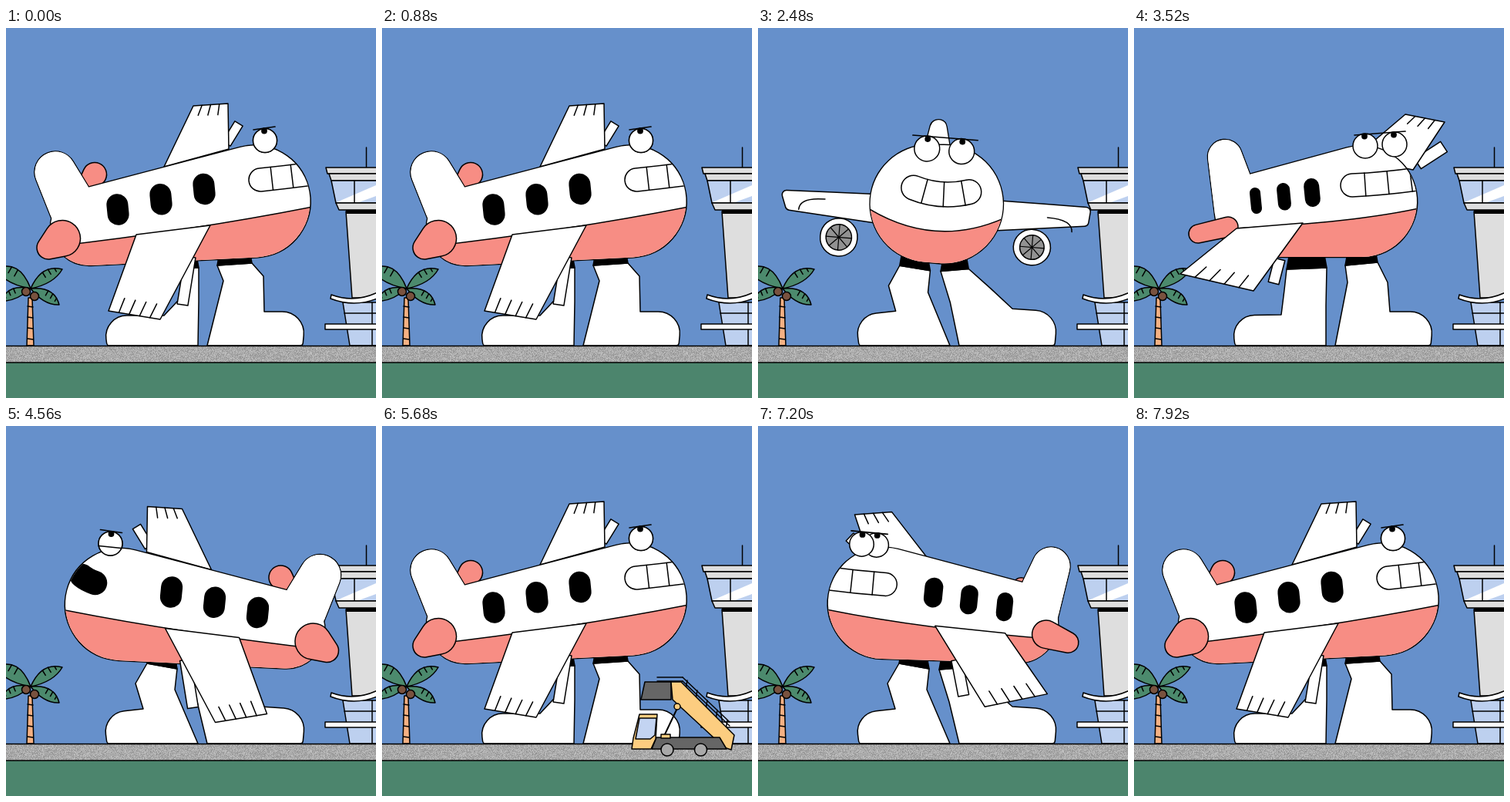
Recreate the animation shown at these times as an HTML page with a canvas. Size 480x480 px, loop 8 s.

```html
<!DOCTYPE html>
<html lang="en">
<head>
<meta charset="utf-8">
<title>Plane twist</title>
<style>
html, body { margin: 0; width: 100%; height: 100%; overflow: hidden; background: #6690cb; }
canvas { display: block; width: 100vw; height: 100vh; }
</style>
</head>
<body>
<canvas id="stage" width="480" height="480"></canvas>
<script>
const STEP = 80, LOOP = 8000, AXIS = 235.75, MIDDLE = 228;
const INK = '#000', WHITE = '#fff', CORAL = '#f78d84';
const ctx = document.getElementById('stage').getContext('2d');

// ---------- helpers ----------
const mix = (a, b, k) => a + (b - a) * k;
const mixPt = (p, q, k) => p.map((v, i) => mix(v, q[i], k));
const parse = text => text.split(' ').map(t => {
  const [x, y, r = 0] = t.split(',').map(Number);
  return [x, y, r];
});
function paint(fill, width = 1.5) {
  if (fill) { ctx.fillStyle = fill; ctx.fill(); }
  if (width) { ctx.lineWidth = width; ctx.strokeStyle = INK; ctx.stroke(); }
}
function line(a, b, width) {
  ctx.beginPath();
  ctx.moveTo(a[0], a[1]);
  ctx.lineTo(b[0], b[1]);
  paint(null, width);
}
function poly(text, fill, width) {
  ctx.beginPath();
  parse(text).forEach(([x, y]) => ctx.lineTo(x, y));
  ctx.closePath();
  paint(fill, width);
}
function circle([x, y, r], fill, width) {
  ctx.beginPath();
  ctx.arc(x, y, r, 0, 7);
  paint(fill, width);
}
function quad([a, c, b]) {
  ctx.beginPath();
  ctx.moveTo(a[0], a[1]);
  ctx.quadraticCurveTo(c[0], c[1], b[0], b[1]);
}
// hull of two circles
function capsule([[x1, y1, r1], [x2, y2, r2]]) {
  const dx = x2 - x1, dy = y2 - y1, a = Math.atan2(dy, dx);
  const ratio = (r1 - r2) / (Math.hypot(dx, dy) || 1);
  const b = Math.acos(Math.max(-1, Math.min(1, ratio)));
  ctx.beginPath();
  ctx.arc(x1, y1, r1, a + b, a - b + 2 * Math.PI);
  ctx.arc(x2, y2, r2, a - b, a + b);
  ctx.closePath();
}
// polygon with a corner radius per point
function rounded(pts) {
  const n = pts.length;
  ctx.beginPath();
  ctx.moveTo(mix(pts[n - 1][0], pts[0][0], .5), mix(pts[n - 1][1], pts[0][1], .5));
  pts.forEach(([x, y, r], i) => {
    const next = pts[(i + 1) % n];
    ctx.arcTo(x, y, next[0], next[1], r);
  });
  ctx.closePath();
}

// ---------- plane: key points facing right, three-quarter and front ----------
const PARTS = {
  body: ['108,258,50 322,225,72.5', '160,243,54 295,225,72', '229,228,77 242.5,228,77'],
  fin: ['64,187,26.5 93,245,32', '118,167,22 136,240,31', '236,128,10 236,151,15'],
  tailNear: ['73,273,23.5 55,285,15', '122,258,13 83,267,12', '236,228,1 237,228,1'],
  tailFar: ['115,190,15.5 104,201,10', '145,215,6 146,220,6', '236,228,1 235,228,1'],
  wingNear: ['169,268 265,256 200,378 133,367', '133,260 219,253 155,341 60,319', '157,220 157,260 36,247,6 31,222,6'],
  wingFar: ['205,180 289,157 288,98 243,101', '286,168 362,184 403,122 352,112', '314.5,220 314.5,260 435.5,247,6 440.5,222,6'],
  engineNear: ['239,297,7 229,359,7', '189,300,7 181,331,7', '109,255,25 109,305,25'],
  engineFar: ['286,150,6 302,124,6', '368,176,8 402,154,8', '362.5,255,25 362.5,305,25'],
  belt: ['55,284 240,263 397,232', '100,261 270,255 369,234', '150,240 235.75,288 321.5,240'],
  mouth: ['330,197,15 367,193,15 405,188,15', '283,204,15 325,202,15 368,196,14', '200,210,16 235.75,222,16 271.5,210,16'],
  eyes: ['336,146,15.5 336,146,15.5', '300,153,16 338,151,16', '213,158,16.5 258.5,158,16.5'],
  brow: ['321,132 349,128', '286,139 352,134', '193,142 278.5,142'],
  panes: ['145,235.5,14 257,209,14', '158,224,7 231,213.5,10', '150,225,0 158,218,0'],
  // legs: band, knee, ankle | knee, band
  legLeft: ['235,311 236,340 205,373 250,355 250,311', '198,313 195,340 191,372 249,360 250,311', '183,308 168,334 178,367 219,342 222,315'],
  legRight: ['274,308 282,328 335,368 334,322 319,305', '274,308 277,330 332,368 329,330 316,304', '235,316 248,358 330,364 300,338 271,313']
};
for (const name in PARTS) PARTS[name] = PARTS[name].map(parse);

function part(name, turn) {
  const i = turn < 1 ? 0 : 1, keys = PARTS[name];
  return keys[i].map((p, j) => mixPt(p, keys[i + 1][j], turn - i));
}

function drawWing(side, get, turn) {
  const near = side === 'Near', wing = get('wing' + side), [a, b] = get('engine' + side);
  const d = Math.hypot(b[0] - a[0], b[1] - a[1]);
  const nx = (a[1] - b[1]) / d * a[2], ny = (b[0] - a[0]) / d * a[2];
  const round = Math.max(0, turn - 1) * 25;
  const engine = [[a, 1], [b, 1], [b, -1], [a, -1]].map(([p, s]) => [p[0] + nx * s, p[1] + ny * s, round]);
  const drawEngine = () => { rounded(engine); paint(WHITE); };

  const front = turn > 1.5;
  if (!front) drawEngine();
  rounded(wing);
  paint(WHITE);
  const [inner, outer, tip, back] = wing, count = near ? 4 : 3;
  if (!front) for (let i = 1; i <= count; i++) {
    const f = i / (count + 1), p = mixPt(back, tip, f), q = mixPt(inner, outer, f);
    line(p, mixPt(p, q, (near ? 20 : 14) / Math.hypot(q[0] - p[0], q[1] - p[1])));
  }
  else {
    if (turn > 1.8) {
      const flap = parse('91,234 58,234 58,250');
      quad(flap.map(([x, y]) => [near ? x : 2 * AXIS - x, y]));
      paint();
    }
    drawEngine();
    const [x, y] = mixPt(a, b, .5), r = Math.min(17, d * .34);
    circle([x, y, r], '#929292');
    for (let i = 0; i < 4; i++) {
      const c = Math.cos(i * Math.PI / 4) * r, s = Math.sin(i * Math.PI / 4) * r;
      line([x - c, y - s], [x + c, y + s], 1.2);
    }
  }
}

function drawLeg([band, knee, ankle, knee2, band2], left) {
  const foot = parse(left ? '126,373,27 131,412,4 249,412' : '261,412 385,412,4 389,368,28');
  rounded(left ? [band, knee, ankle, ...foot, knee2, band2] : [band, knee, ...foot, ankle, knee2, band2]);
  paint(WHITE);
  rounded([band, band2, [band2[0] - 4, band2[1] - 22, 0], [band[0] + 4, band[1] - 22, 0]]);
  paint(INK);
}

function drawFuselage(get, side, shut) {
  const body = get('body'), fin = get('fin'), belt = get('belt'), mouth = get('mouth');
  capsule(fin); paint(null, 2.6); paint(WHITE, 0);
  capsule(body); paint(null, 2.6); paint(WHITE, 0);
  if (side) { capsule(fin); paint(WHITE, 0); }

  ctx.save();
  capsule(body);
  ctx.clip();
  quad(belt);
  ctx.lineTo(belt[2][0], 420);
  ctx.lineTo(belt[0][0], 420);
  paint(CORAL, 0);
  quad(belt);
  paint();

  if (side) {
    const [first, last] = get('panes');
    for (let i = 0; i < 3; i++) {
      const [x, y, w] = mixPt(first, last, i / 2), h = 14 + w * .45;
      ctx.save();
      ctx.translate(x, y);
      ctx.rotate(-.1);
      rounded([[-w, -h, w], [w, -h, w], [w, h, w], [-w, h, w]]);
      paint(INK, 0);
      ctx.restore();
    }
  }

  if (shut) {
    mouth[0][0] += 26;
    mouth[2][0] -= 32;
  }
  const r = mouth[0][2];
  quad(mouth);
  paint(null, 2 * r + 1.5);
  if (!shut) {
    ctx.lineWidth = 2 * r - 1.5;
    ctx.strokeStyle = WHITE;
    ctx.stroke();
    for (const t of [.2, .55, .9]) {
      const p = mixPt(mouth[0], mouth[1], t), q = mixPt(mouth[1], mouth[2], t), [x, y] = mixPt(p, q, t);
      const d = Math.hypot(q[0] - p[0], q[1] - p[1]), nx = (p[1] - q[1]) / d * r, ny = (q[0] - p[0]) / d * r;
      line([x + nx, y + ny], [x - nx, y - ny]);
    }
  }
  ctx.restore();
}

function drawPlane(heading) {
  const flip = heading > 2, turn = flip ? 4 - heading : heading;
  const get = name => part(name, turn), side = turn < 1.5;
  // the front view leans and sits a little to the left
  const lean = Math.max(0, turn - 1);
  function posed(draw) {
    ctx.save();
    ctx.translate(AXIS - 4.25 * lean, MIDDLE);
    ctx.rotate(.087 * lean);
    if (flip) ctx.scale(-1, 1);
    ctx.translate(-AXIS, -MIDDLE + (flip ? 6.5 * (1 - turn / 2) : 0));
    draw();
    ctx.restore();
  }
  const tail = name => { capsule(get(name)); paint(CORAL); };
  const nearWing = () => { tail('tailNear'); drawWing('Near', get, turn); };

  posed(() => {
    tail('tailFar');
    drawWing('Far', get, turn);
    if (!side) nearWing();
  });
  for (const leg of ['legLeft', 'legRight']) drawLeg(part(leg, Math.min(heading, 2)), leg === 'legLeft');
  posed(() => {
    const shut = flip && turn < .5;
    drawFuselage(get, side, shut);
    if (side) nearWing();
    for (const eye of get('eyes')) {
      const [x, y] = eye;
      circle(eye, WHITE);
      circle([x - 1 + lean, y - 12.5, 3.9], INK, 0);
      if (shut) line([x + 15, y + 3], [x - 14, y + 6]);
    }
    line(...get('brow'), 1.7);
  });
}

// heading over time: 0 right, 2 front, 4 left
const TURNS = [[0, 0], [12, 0], [20, 2], [26, 4], [34, 1], [39, 0], [40, 0], [44, 1],
  [55, 4], [57, 4], [66, 0], [78, 0], [82, 1], [88, 4], [97, 0], [100, 0]];
function headingAt(step) {
  const i = TURNS.findIndex(key => key[0] > step);
  const [t0, a] = TURNS[i - 1], [t1, b] = TURNS[i], k = (step - t0) / (t1 - t0);
  return mix(a, b, k * k * (3 - 2 * k));
}

// ---------- scenery ----------
function drawLeaf(tip, over, under) {
  const base = [32, 338], dx = tip[0] - base[0], dy = tip[1] - base[1];
  const bend = k => [mix(base[0], tip[0], .6) + dy * k, mix(base[1], tip[1], .6) - dx * k];
  const up = bend(over), down = bend(under);
  ctx.beginPath();
  ctx.moveTo(...base);
  ctx.quadraticCurveTo(...up, ...tip);
  ctx.quadraticCurveTo(...down, ...base);
  paint('#4c8a6d');
  for (const t of [.45, .62, .8]) {
    const at = c => mixPt(mixPt(base, c, t), mixPt(c, tip, t), t);
    line(at(up), mixPt(at(up), at(down), .5));
  }
}
function drawPalm() {
  poly('29,350 34,350 36,412 27,412', '#f5b183');
  for (let y = 361; y < 410; y += 14) line([28, y], [35, y + 1]);
  drawLeaf([73, 313], .42, -.22);
  drawLeaf([69, 359], .42, -.25);
  drawLeaf([-14, 312], -.5, .22);
  drawLeaf([-6, 354], -.42, .2);
  circle([26, 342, 5.5], '#79523f');
  circle([37, 348, 5.5], '#79523f');
}
function drawTower() {
  const grey = '#dedede', glass = '#bdd0ef';
  line([467.5, 155], [467.5, 181]);
  poly('441,238 490,238 490,350 449,350', grey);
  poly('441,236 490,236 490,241 441,241', INK, 0);
  poly('415,181 490,181 490,189 417,189', grey);
  poly('419,189 490,189 490,198 422,198', grey);
  poly('422,198 490,198 490,227 428,227', glass);
  poly('429,226 480,204 480,218 458,226', WHITE, 0);
  line([452, 198], [452, 227]);
  poly('428,227 490,227 490,236 432,236', grey);
  poly('437,356 490,356 490,412 446,412', glass);
  line([439, 370], [480, 370]);
  line([475, 356], [475, 412]);
  quad(parse('422,346 454,358 486,341'));
  ctx.lineTo(486, 349);
  ctx.quadraticCurveTo(454, 364, 421, 351);
  ctx.closePath();
  paint(WHITE);
  poly('414,384 490,384 490,391 414,391', WHITE);
}

const runway = document.createElement('canvas');
runway.width = 480;
runway.height = 22;
{
  const g = runway.getContext('2d');
  let seed = 7;
  for (let i = 0; i < 480 * 22; i++) {
    seed = (seed * 1664525 + 1013904223) % 4294967296;
    const v = 145 + Math.floor(seed / 4294967296 * 50);
    g.fillStyle = `rgb(${v},${v},${v})`;
    g.fillRect(i % 480, Math.floor(i / 480), 1, 1);
  }
}
function drawGround() {
  ctx.drawImage(runway, 0, 412);
  ctx.fillStyle = '#4c856d';
  ctx.fillRect(0, 434, 480, 46);
  line([0, 412.5], [480, 412.5]);
  line([0, 434], [480, 434]);
}
function drawStairs(x) {
  const amber = '#fccd80', dark = '#666';
  ctx.save();
  ctx.translate(x, 0);
  for (const lift of [0, 5]) {
    line([33, 331 - lift], [66, 331 - lift]);
    line([66, 331 - lift], [127, 389 - lift]);
  }
  for (let i = 0; i < 5; i++) line([72 + i * 13, 330 + i * 13], [70 + i * 13, 341 + i * 13]);
  line([61, 362], [42, 402], 2);
  poly('17,332 51,332 51,355 12,355', dark);
  poly('51,332 64,332 133,401 129,420 120,417 53,355', amber);
  circle([59, 364, 4], amber);
  poly('32,404 114,404 123,419 26,419', dark);
  poly('38,400 50,400 50,405 38,405', amber);
  poly('10,374 33,374 31,406 25,419 0,419 2,405', amber);
  poly('10,379 32,379 30,401 24,406 5,406', '#c3d4f2');
  circle([46, 420, 8], '#a9a9a9');
  circle([89.5, 420, 8], '#a9a9a9');
  ctx.restore();
}

function frame(now) {
  const step = Math.floor(now % LOOP / STEP);
  ctx.lineJoin = ctx.lineCap = 'round';
  ctx.fillStyle = '#6690cb';
  ctx.fillRect(0, 0, 480, 480);
  drawTower();
  drawPalm();
  drawPlane(headingAt(step));
  drawGround();
  const x = 324 - (step - 71) * 26.91;
  if (x > -140 && x < 490) drawStairs(x);
  requestAnimationFrame(frame);
}
requestAnimationFrame(frame);
</script>
</body>
</html>
```
